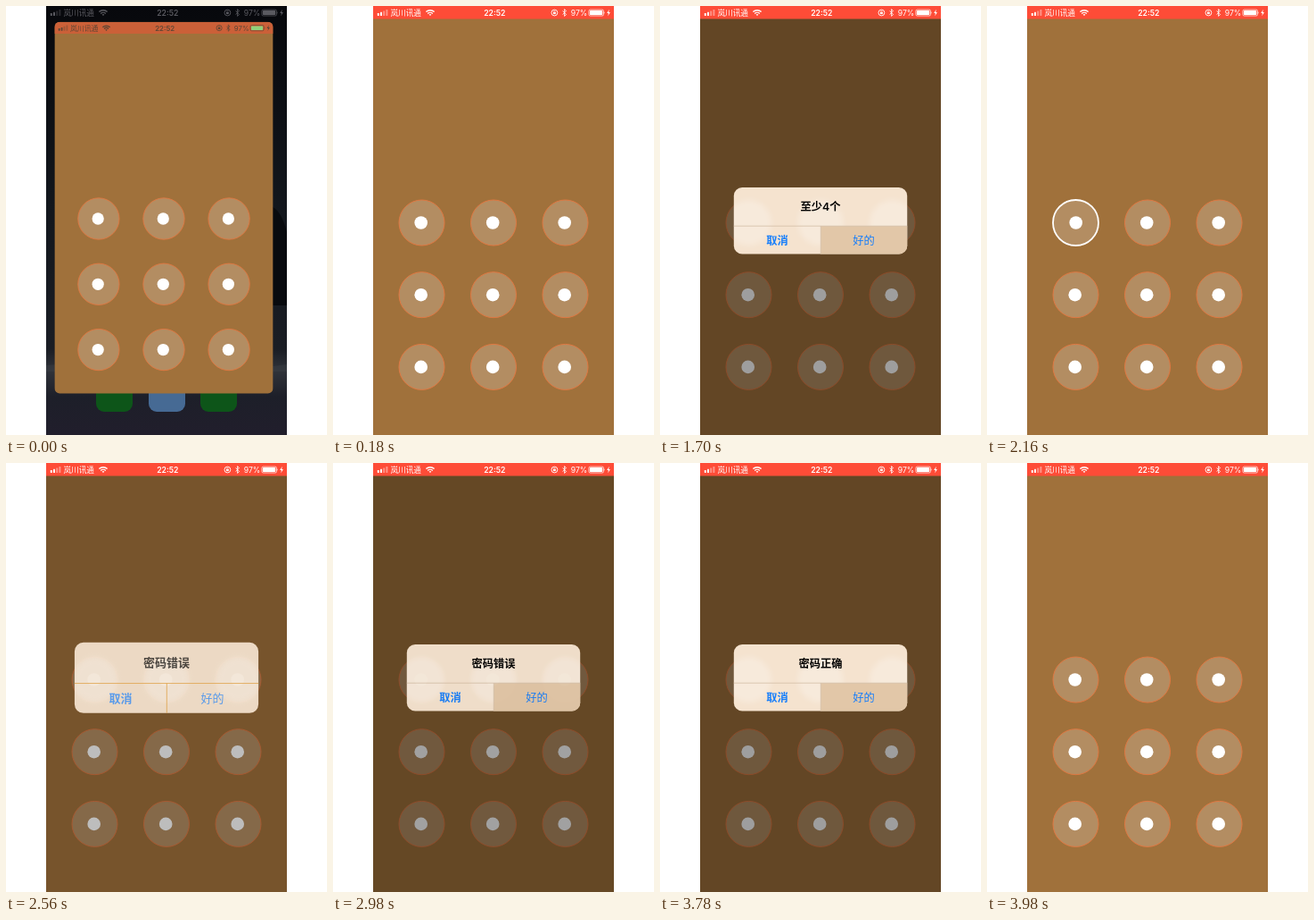
An HTML page that plays this animation: 360 by 480 pixels, repeating every 4 s.

```html
<!DOCTYPE html>
<html lang="zh-CN">
<head>
<meta charset="utf-8">
<title>手势解锁</title>
<style>
  html, body { margin: 0; width: 100%; height: 100%; overflow: hidden; background: #fff; }
  svg { display: block; width: 100vw; height: 100vh; }
  text { font-family: Inter, "Noto Sans CJK SC", "Noto Sans CJK", sans-serif; }
  .status text { font-size: 8.64px; fill: currentColor; }
  .status .bold { font-weight: 600; text-anchor: middle; }
  .status .line { fill: none; stroke: currentColor; }
  #card text { font-size: 12.24px; text-anchor: middle; }
  #card .bold { font-weight: 600; }
  #card .button { fill: #167efb; }
  #trail { fill: none; stroke: rgba(32, 210, 254, .5); stroke-width: 5.8; stroke-linejoin: bevel; }
  .key circle:first-child { fill: rgba(255, 255, 255, .2); stroke: #e07842; stroke-width: 1; }
  .key circle:last-child { fill: #fff; }
  .key.on circle:first-child { stroke: #fff; stroke-width: 1.8; }
  .key.on circle:last-child { transform: translateX(1px); }
</style>
</head>
<body>
<svg viewBox="0 0 360 480" xmlns="http://www.w3.org/2000/svg">
  <defs>
    <linearGradient id="night" x1="0" y1="0" x2="0" y2="1">
      <stop offset="0" stop-color="#07080c"/>
      <stop offset=".45" stop-color="#12161c"/>
      <stop offset=".8" stop-color="#1a1d24"/>
      <stop offset=".85" stop-color="#30333a"/>
      <stop offset=".91" stop-color="#1d1f29"/>
      <stop offset="1" stop-color="#211e2c"/>
    </linearGradient>
    <clipPath id="window"><rect id="frame" x="45" width="270"/></clipPath>
    <clipPath id="cardClip"><rect id="cardArea" x="82.8" y="203" width="194.4" height="74.6" rx="9.4"/></clipPath>
    <filter id="soft" x="-50%" y="-50%" width="200%" height="200%"><feGaussianBlur stdDeviation="3"/></filter>
    <g id="status" class="status">
      <g fill="currentColor">
        <rect x="49.8" y="8" width="2" height="2.9" rx=".4"/>
        <rect x="53" y="6.8" width="2" height="4.1" rx=".4"/>
        <rect x="56.2" y="5.4" width="2" height="5.5" rx=".4" opacity=".4"/>
        <rect x="59.4" y="4" width="2" height="6.9" rx=".4" opacity=".4"/>
      </g>
      <text x="64.4" y="10.8">岚川讯通</text>
      <g class="line" stroke-width="1.4">
        <path d="M104.4 6.6a6.6 6.6 0 0 1 9.2 0"/>
        <path d="M106.2 8.5a4 4 0 0 1 5.6 0"/>
      </g>
      <path d="M107.6 9.6a2 2 0 0 1 2.8 0L109 11.1z" fill="currentColor"/>
      <text class="bold" x="181.3" y="10.7">22:52</text>
      <circle class="line" cx="248.4" cy="7.5" r="3.4" stroke-width=".9"/>
      <rect x="247" y="6.9" width="2.8" height="2.2" fill="currentColor"/>
      <path class="line" d="M247.6 7v-.7a.8 .8 0 0 1 1.6 0V7" stroke-width=".6"/>
      <path class="line" d="M257.6 5.5l4 4-2 1.9v-7.8l2 1.9-4 4" stroke-width=".85"/>
      <text x="266.8" y="10.7">97%</text>
      <rect class="line" x="286.9" y="4.1" width="16.6" height="6.9" rx="1.6" stroke-width=".7"/>
      <rect x="287.9" y="5.1" width="14.4" height="4.9" rx=".8" style="fill: var(--battery)"/>
      <path d="M304.3 6.3q1.2 1.2 0 2.5z" fill="currentColor"/>
      <path d="M309.8 3.8l-2.6 4.2h1.7l-.6 3.2 2.6-4.3h-1.7z" fill="currentColor"/>
    </g>
  </defs>

  <rect width="360" height="480" fill="#fff"/>
  <g id="home">
    <rect x="45" width="270" height="480" fill="url(#night)"/>
    <path d="M299 225q10 5 16 28v82h-16z" fill="#080a0e"/>
    <path d="M45 402q60-5 140 1t130-2v8H45z" fill="#3b3e45" opacity=".5"/>
    <rect x="101" y="413" width="41" height="41" rx="9" fill="#0d5519"/>
    <rect x="160" y="413" width="41" height="41" rx="9" fill="#466a94"/>
    <rect x="218" y="413" width="41" height="41" rx="9" fill="#0d5519"/>
    <use href="#status" style="color: #5a5a60; --battery: #5a5a60"/>
  </g>

  <g id="app">
    <g clip-path="url(#window)">
      <rect x="45" width="270" height="480" fill="#a0713b"/>
      <rect id="bar" x="45" width="270" height="14.5"/>
      <use id="appStatus" href="#status"/>
      <polyline id="trail"/>
      <g id="keys"></g>
    </g>
  </g>

  <g id="alert">
    <rect id="dim" x="45" y="14.5" width="270" height="465.5"/>
    <g id="sheet">
      <g id="glass" clip-path="url(#cardClip)">
        <rect x="45" y="180" width="270" height="120" fill="#f5e3cf"/>
        <g id="ghosts" filter="url(#soft)" fill="#fff" opacity=".26"></g>
      </g>
      <g id="card">
        <path id="pressed" d="M180.4 246.2h96.8v22a9.4 9.4 0 0 1-9.4 9.4h-87.4z" fill="#e2c7a8"/>
        <path id="rules" d="M82.8 246.2h194.4M180.3 246.2v31.4" fill="none" stroke-width=".8"/>
        <g id="labels">
          <text id="title" class="bold" x="180" y="228.6"></text>
          <text class="button bold" x="131.4" y="266.6">取消</text>
          <text class="button" x="228.6" y="266.6">好的</text>
        </g>
      </g>
    </g>
  </g>
</svg>
<script>
const LOOP = 4000, OPEN = 180, POP = 200, FADE = 190, DIM = .38;
const $ = id => document.getElementById(id);
const clamp = v => Math.min(1, Math.max(0, v));
const lerp = (a, b, k) => a + (b - a) * k;
const mix = (a, b, k) => `rgb(${a.map((v, i) => Math.round(lerp(v, b[i], k)))})`;
const set = (id, attrs) => {
  for (const name in attrs) $(id).setAttribute(name, attrs[name]);
};

const WHITE = [255, 255, 255];
const centre = i => [99.5 + 80.5 * (i % 3), 242.5 + 80.7 * Math.floor(i / 3)];

// Keys are numbered 0 to 8, row by row.
const swipes = [
  { from: 1060, to: 1240, keys: [0, 1, 2], touch: [99.5, 242.5] },
  { from: 2160, to: 2480, keys: [0, 1, 2, 5, 8], touch: [94, 241.5] },
  { from: 3220, to: 3420, keys: [0, 3, 6, 7, 8], touch: [99.5, 242.5] }
];
const alerts = [
  { from: 1240, press: 1700, title: '至少4个' },
  { from: 2480, press: 2940, title: '密码错误' },
  { from: 3420, press: 3760, title: '密码正确' }
];

function build() {
  const circle = (x, y, r) => `<circle cx="${x}" cy="${y}" r="${r}"/>`;
  let keys = '', ghosts = '';
  for (let i = 0; i < 9; i++) {
    const [x, y] = centre(i);
    keys += `<g class="key">${circle(x, y, 25.5)}${circle(x - .8, y, 7.3)}</g>`;
    if (i < 3) ghosts += circle(x, y, 25.5);
  }
  $('keys').innerHTML = keys;
  $('ghosts').innerHTML = ghosts;
}

function drawWindow(t) {
  const k = 1 - (1 - clamp(t / OPEN)) ** 2;
  const x = lerp(13.7, 0, k), y = lerp(18, 0, k);
  set('app', { transform: `translate(${x} ${y}) scale(${lerp(.907, 1, k)})` });
  set('frame', { height: lerp(457.5, 480, k), rx: lerp(6.6, 0, k) });
  set('bar', { fill: mix([202, 96, 56], [254, 76, 55], k) });
  $('appStatus').style.color = mix([92, 68, 50], WHITE, k);
  $('appStatus').style.setProperty('--battery', mix([143, 208, 122], WHITE, k));
}

function drawSwipe(t) {
  const s = swipes.find(s => t >= s.from && t < s.to);
  let points = [], lit = [];
  if (s) {
    const last = s.keys.length - 1;
    const u = clamp((t - s.from) / (s.to - s.from - 30)) * last;
    const n = Math.floor(u);
    lit = s.keys.slice(0, n + 1);
    const a = n ? centre(s.keys[n]) : s.touch;
    const b = centre(s.keys[Math.min(n + 1, last)]);
    points = [...lit.map(centre), a.map((v, i) => lerp(v, b[i], u - n))];
  }
  set('trail', { points: points.join(' ') });
  [...$('keys').children].forEach((key, i) => key.classList.toggle('on', lit.includes(i)));
}

function drawAlert(t) {
  const a = alerts.find(a => t >= a.from && t < a.press + 20 + FADE);
  $('alert').style.display = a ? '' : 'none';
  if (!a) return;
  const p = 1 - (1 - clamp((t - a.from) / POP)) ** 2.2;
  const f = clamp((t - a.press - 20) / FADE);
  const shown = 1 - f * f * (3 - 2 * f);
  const size = lerp(1.19, 1, p);
  const transform = `translate(180 240.3) scale(${size}) translate(-180 -240.3)`;
  const glass = 1 - (1 - p) ** 2.4;
  const rule = p < .68
    ? mix([105, 68, 25], [224, 166, 82], clamp((p - .2) / .48))
    : mix([224, 166, 82], [211, 190, 166], (p - .68) / .32);

  set('dim', { opacity: DIM * p * shown });
  set('sheet', { opacity: shown });
  set('cardArea', { transform });
  set('card', { transform });
  set('glass', { opacity: glass });
  set('rules', { stroke: rule, opacity: clamp(p * 4) });
  set('labels', { opacity: p });
  set('pressed', { opacity: t >= a.press ? 1 : 0 });
  $('title').textContent = a.title;
}

const start = performance.now();
function tick() {
  const t = (performance.now() - start) % LOOP;
  drawWindow(t);
  drawSwipe(t);
  drawAlert(t);
  requestAnimationFrame(tick);
}
build();
tick();
</script>
</body>
</html>
```
